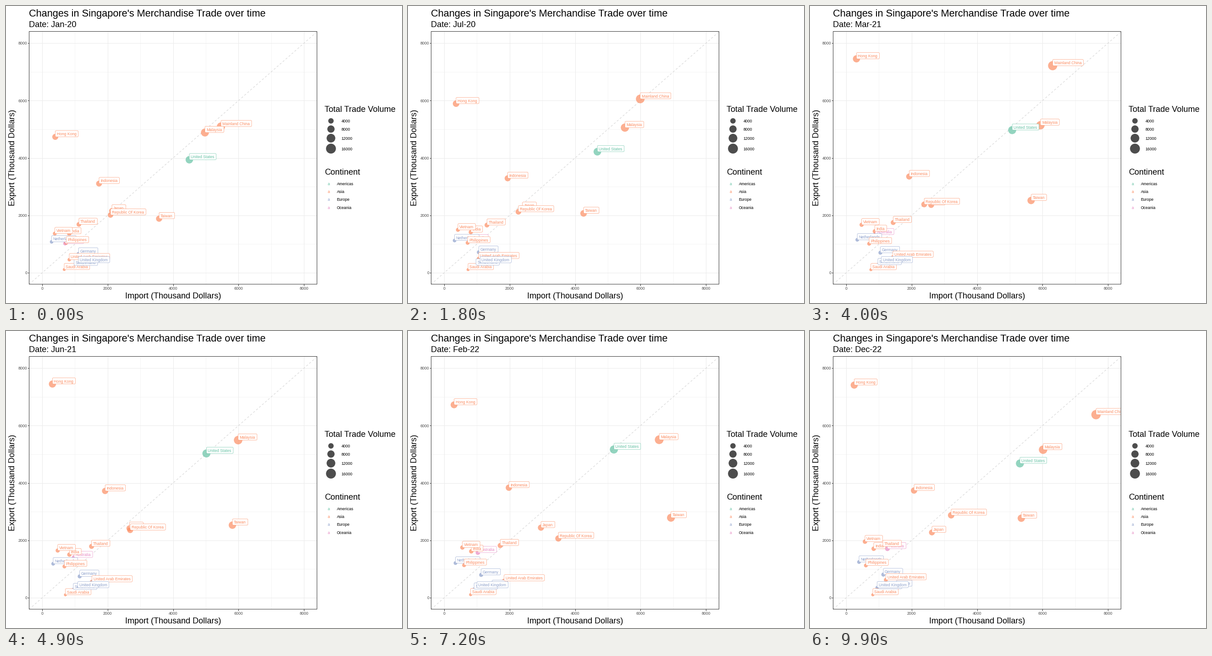
Recreate the animation shown at these times as a matplotlib script. Size 864 by 648 pixels, loop 10 s.

```python
import numpy as np
import matplotlib.pyplot as plt
from matplotlib.animation import FuncAnimation
from matplotlib.patches import Circle, FancyBboxPatch, Rectangle

W, H, DPI = 864, 648, 72
FRAMES, INTERVAL = 100, 100
LAST = FRAMES - 1
LEFT, RIGHT, TOP, BOTTOM = 50.5, 678.5, 55.5, 607.0
LABEL_SIZE, LABEL_H, PAD = 8.54, 13.6, 3.6
GREY20, GREY30, GREY92 = "#333333", "#4d4d4d", "#ebebeb"
CONTINENTS = {"Americas": "#66c2a5", "Asia": "#fc8d62",
              "Europe": "#8da0cb", "Oceania": "#e78ac3"}

# Times of a path's key points, by how many it has
KEY_TIMES = {2: (0, LAST), 3: (0, 72, LAST), 4: (0, 40, 72, LAST)}
MONTHS = np.linspace(0, LAST, 36)
MONTH_NAMES = "Jan Feb Mar Apr May Jun Jul Aug Sep Oct Nov Dec".split()

plt.rcParams["font.family"] = "Liberation Sans"
rng = np.random.default_rng(20)


def px(v):
    return 79 + v * 0.071375


def py(v):
    return 582 - v * 0.0626


def radius(total):
    return 1 + 0.0774 * np.sqrt(total)


def series(values):
    """Trend through the key values, straight between slightly uneven months."""
    keys = KEY_TIMES[len(values)]
    distance = np.abs(MONTHS[:, None] - keys).min(axis=1)
    sway = rng.normal(0, 0.035, MONTHS.size) * np.clip(distance / 4, 0, 1)
    monthly = np.clip(np.interp(MONTHS, keys, values) * (1 + sway), 0, 8000)
    return np.interp(np.arange(FRAMES), MONTHS, monthly)


def layer(left, right, top, bottom):
    """Axes over part of the stage, measured in stage pixels."""
    ax = fig.add_axes([left / W, 1 - bottom / H, (right - left) / W, (bottom - top) / H])
    ax.set(xlim=(left, right), ylim=(bottom, top))
    ax.axis("off")
    return ax


fig = plt.figure(figsize=(W / DPI, H / DPI), dpi=DPI, facecolor="white")
page = layer(0, W, 0, H)
panel = layer(LEFT, RIGHT, TOP, BOTTOM)
overlay = layer(0, W, 0, H)


def write(x, y, text, size, color="black", **kw):
    return page.text(x, y, text, fontsize=size, color=color, va="baseline", **kw)


def draw_panel():
    for v in range(0, 9000, 1000):
        width = 1.07 if v % 2000 == 0 else 0.53
        panel.axvline(px(v), color=GREY92, lw=width, zorder=0)
        panel.axhline(py(v), color=GREY92, lw=width, zorder=0)
    panel.plot([px(-400), px(8400)], [py(-400), py(8400)], color="lightgrey",
               lw=1.07, dashes=(4, 4), dash_capstyle="butt", zorder=1)
    overlay.add_patch(Rectangle((LEFT, TOP), RIGHT - LEFT, BOTTOM - TOP,
                                fill=False, ec=GREY20, lw=1, snap=False))
    for v in range(0, 9000, 2000):
        page.plot([px(v)] * 2, [BOTTOM, BOTTOM + 2.75], color=GREY20, lw=1.07)
        page.plot([LEFT - 2.75, LEFT], [py(v)] * 2, color=GREY20, lw=1.07)
        write(px(v), 619, str(v), 8.8, GREY30, ha="center")
        write(46, py(v) + 3.2, str(v), 8.8, GREY30, ha="right")


def draw_titles():
    write(50.5, 22.5, "Changes in Singapore's Merchandise Trade over time", 21.7)
    write(364.5, 638.5, "Import (Thousand Dollars)", 18, ha="center")
    write(19, 331, "Export (Thousand Dollars)", 18, ha="center",
          rotation=90, rotation_mode="anchor")


def draw_legend():
    write(695, 231, "Total Trade Volume", 18.1)
    y = 244.5
    for total in range(4000, 17000, 4000):
        r = radius(total)
        height = max(17.3, 2 * r + 2.5)
        y += height / 2
        page.add_patch(Circle((709, y - 2.5), r, fc=GREY30, ec="none"))
        write(731.5, y + 0.9, str(total), 8.8)
        y += height / 2
    write(695, 368, "Continent", 18.1)
    for i, (name, color) in enumerate(CONTINENTS.items()):
        y = 390.8 + 17.3 * i
        write(703.8, y, "a", LABEL_SIZE, color, ha="center")
        write(721.5, y, name, 8.8)


class Country:
    def __init__(self, order, name, continent, *points):
        imports, exports = zip(*points)
        self.imports, self.exports = series(imports), series(exports)
        color = CONTINENTS[continent]
        z = 10 + order
        self.dot = Circle((0, 0), 1, fc=color, ec="none", alpha=0.7,
                          zorder=2 + order / 100)
        self.text = panel.text(0, 0, name, fontsize=LABEL_SIZE, color=color,
                               va="baseline", clip_on=True, zorder=z + 0.5)
        self.width = self.text.get_window_extent().width + 2 * PAD
        self.box = FancyBboxPatch((0, 0), self.width, LABEL_H, fc="white", ec=color,
                                  lw=0.6, zorder=z,
                                  boxstyle="round,pad=0,rounding_size=2.1")
        panel.add_patch(self.dot)
        panel.add_patch(self.box)

    def move(self, i):
        a, b = self.imports[i], self.exports[i]
        x, y = px(a), py(b)
        self.dot.center = x, y
        self.dot.set_radius(radius(a + b))
        self.box.set_bounds(x, y - LABEL_H, self.width, LABEL_H)
        self.text.set_position((x + 3.1, y - 3.1))

    def show(self, visible):
        for part in (self.dot, self.box, self.text):
            part.set_visible(visible)


draw_panel()
draw_titles()
draw_legend()
date_text = write(50.5, 46.5, "", 18.1)

# Key points are (import, export); later names lie on top
PATHS = [
    ("Australia", "Oceania", (700, 1020), (1260, 1710)),
    ("France", "Europe", (1485, 415), (1540, 400)),
    ("Germany", "Europe", (1110, 655), (1135, 807)),
    ("Hong Kong", "Asia", (399, 4736), (315, 7484), (301, 6669), (245, 7412)),
    ("India", "Asia", (827, 1358), (841, 1709)),
    ("Indonesia", "Asia", (1737, 3107), (2003, 3818), (2074, 3738)),
    ("Japan", "Asia", (2130, 2157), (2963, 2444), (2620, 2276)),
    ("Mainland China", "Asia", (5464, 5096), (6291, 7284), (7600, 6500), (7636, 6382)),
    ("Malaysia", "Asia", (4974, 4888), (6606, 5527), (6018, 5160)),
    ("Netherlands", "Europe", (287, 1078), (392, 1246)),
    ("Philippines", "Asia", (736, 1046), (602, 1126)),
    ("Republic Of Korea", "Asia", (2088, 2013), (2396, 2396), (3537, 2061), (3208, 2875)),
    ("Saudi Arabia", "Asia", (673, 112), (813, 104)),
    ("Switzerland", "Europe", (974, 255), (981, 312)),
    ("Taiwan", "Asia", (3573, 1885), (6963, 2804), (5352, 2772)),
    ("Thailand", "Asia", (1121, 1685), (1737, 1821), (1121, 1789)),
    ("United Arab Emirates", "Asia", (827, 455), (1891, 583), (1212, 623)),
    ("United Kingdom", "Europe", (1107, 351), (946, 351)),
    ("United States", "Americas", (4497, 3938), (5191, 5272), (5310, 4681)),
    ("Vietnam", "Asia", (385, 1366), (574, 1957)),
]
countries = {path[0]: Country(i, *path) for i, path in enumerate(PATHS)}


def update(i):
    day = np.datetime64("2020-01-01") + int(i / LAST * 1065)
    year, month = str(day).split("-")[:2]
    date_text.set_text(f"Date: {MONTH_NAMES[int(month) - 1]}-{year[2:]}")
    for country in countries.values():
        country.move(i)
    # Months beyond the axis limits are dropped
    m = i * 35 / LAST
    countries["Mainland China"].show(m <= 15 or 26 <= m <= 27 or m >= 31)


anim = FuncAnimation(fig, update, frames=FRAMES, init_func=lambda: update(0),
                     interval=INTERVAL, repeat=True, repeat_delay=0, blit=False)
plt.show()
```
